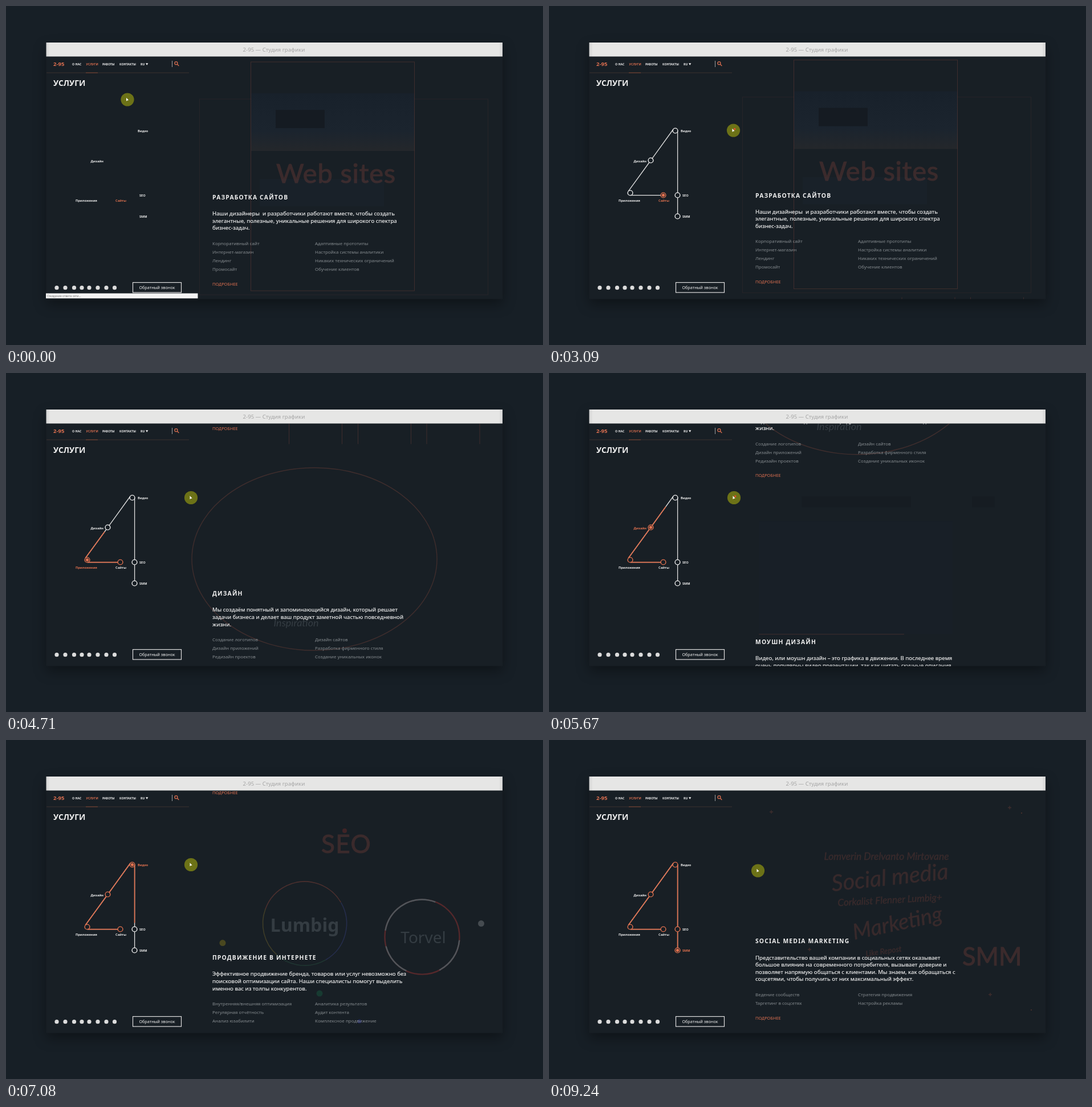
Animation of 942 by 594 pixels, one loop 9.36 s. Source, as an HTML page:

```html
<!DOCTYPE html>
<html lang="ru">
<head>
<meta charset="utf-8">
<title>Студия графики</title>
<style>
  html, body { margin: 0; width: 100%; height: 100%; overflow: hidden; background: #171f26; }
  svg { display: block; width: 942px; height: 594px; }
  text { font-family: "Noto Sans", "Open Sans", sans-serif; fill: #f1f1f1; }
  .title { font-weight: 700; letter-spacing: 1.2px; }
  .lead { font-weight: 500; stroke: #f1f1f1; stroke-width: .15px; }
  .item { fill: #858b8f; }
  .accent { fill: #dc6f50; }
  .nav, .label { font-weight: 600; }
  .big { font-family: Lato, sans-serif; fill: #c85a48; stroke: #c85a48; opacity: .2; }
  .script { font-family: Lato, sans-serif; font-style: italic; fill: #c85a48; stroke: #c85a48; stroke-width: .4px; opacity: .18; text-anchor: middle; }
  .pale { fill: #8d98a0; stroke: none; opacity: .24; }
  .outline { fill: none; stroke: #c8604a; stroke-opacity: .22; }
  .mid { text-anchor: middle; }
</style>
</head>
<body>
<svg viewBox="0 0 942 594">
  <defs>
    <filter id="shadow" x="-10%" y="-15%" width="120%" height="135%" color-interpolation-filters="sRGB">
      <feDropShadow dx="0" dy="9" stdDeviation="11" flood-color="#000" flood-opacity=".36"/>
    </filter>
    <linearGradient id="bar">
      <stop offset="0" stop-color="#d2d2d2"/><stop offset=".008" stop-color="#e6e6e5"/>
      <stop offset=".992" stop-color="#e6e6e5"/><stop offset="1" stop-color="#d2d2d2"/>
    </linearGradient>
    <linearGradient id="photo" x2="0" y2="1">
      <stop offset="0" stop-color="#18212b"/><stop offset=".65" stop-color="#1b242e"/>
      <stop offset="1" stop-color="#24272b"/>
    </linearGradient>
    <clipPath id="view"><rect x="322" y="88.5" width="549" height="425"/></clipPath>
    <clipPath id="page"><rect x="322" y="88.5" width="549" height="425.5"/></clipPath>
  </defs>
  <rect width="942" height="594" fill="#171f26"/>
  <rect x="70.5" y="64" width="800.5" height="449.5" fill="#181f25" filter="url(#shadow)"/>
  <g clip-path="url(#view)"><g id="scroller"></g></g>
  <rect x="70.5" y="64" width="800.5" height="24.5" fill="url(#bar)"/>
  <g id="sidebar"></g>
  <g id="graph"></g>
  <g id="status"></g>
  <g id="cursor">
    <circle r="11.6" fill="#6c7217"/>
    <path d="M-2-3.2v6l1.7-1.4 2.4-.3z" fill="#fff"/>
    <circle id="wheel" cx="2.2" cy="-2.4" r="1.8" fill="#e0502e"/>
  </g>
</svg>
<script>
const LOOP = 9360, PAGE = 425.5, SCROLL_TIME = 900;
const SCROLL_STARTS = [2977, 4060, 5141, 6418, 7542];
const ORANGE = [224, 113, 79], WHITE = [236, 236, 236];
const $ = id => document.getElementById(id);

// y is the vertical middle of the capitals
const text = (x, y, size, cls, str, extra = '') =>
  `<text x="${x}" y="${y + size * .36}" font-size="${size}" class="${cls}" ${extra}>${str}</text>`;
const script = (x, y, size, str, angle = 0, cls = '') =>
  text(x, y, size, 'script ' + cls, str, `transform="rotate(${angle} ${x} ${y})"`);
const box = (x, y, w, h, r = 0, extra = '') =>
  `<rect class="outline" x="${x}" y="${y}" width="${w}" height="${h}" rx="${r}" ${extra}/>`;
const disc = (x, y, r, fill, opacity = 1) =>
  `<circle cx="${x}" cy="${y}" r="${r}" fill="${fill}" opacity="${opacity}"/>`;
const plus = (x, y) => `<path class="outline" stroke-width="1.4" d="M${x - 3} ${y}h6m-3-3v6"/>`;
// part is a percentage of the full turn, color any CSS colour
const arc = (x, y, r, from, part, color, width = 1.6) =>
  `<circle cx="${x}" cy="${y}" r="${r}" fill="none" stroke="${color}" stroke-width="${width}"
    pathLength="100" stroke-dasharray="${part} 100" transform="rotate(${from} ${x} ${y})"/>`;

const sections = [
  {
    title: 'РАЗРАБОТКА САЙТОВ',
    lead: ['Наши дизайнеры\u00a0 и разработчики работают вместе, чтобы создать',
      'элегантные, полезные, уникальные решения для широкого спектра', 'бизнес-задач.'],
    left: ['Корпоративный сайт', 'Интернет-магазин', 'Лендинг', 'Промосайт'],
    right: ['Адаптивные прототипы', 'Настройка системы аналитики', 'Никаких технических ограничений', 'Обучение клиентов'],
    art: box(339.5, 163, 506, 343, 0, 'opacity=".35"') +
      '<rect x="430" y="153" width="286.5" height="101" fill="url(#photo)"/>' +
      '<rect x="473" y="182" width="86" height="32" fill="#151b22"/>' +
      '<rect x="445" y="303" width="218" height="48" fill="#192129"/>' +
      box(429.5, 98, 287, 401) + text(474, 293, 47, 'big', 'Web sites', 'letter-spacing=".8"')
  }, {
    title: 'ПРИЛОЖЕНИЯ',
    lead: ['Опыт создания двух собственных сервисов позволяет нам с уверенностью',
      'браться за приложения любой сложности. Мы думающая команда и знаем,',
      'что польза и удобство — это ключевые составляющие проекта.'],
    left: ['vOR приложения', 'Тестирование работоспособности', 'Работа с Ore Vault и Lumtra Park', 'Стратегия монетизации'],
    right: ['Corvand приложения', 'Создание прототипов', 'Подключение аналитики'],
    art: box(377.5, 143.5, 92.5, 182.5, 12) + box(496.5, 143.5, 92.5, 182.5, 12) +
      [619, 739.5].map(x => box(x, 60, 93, 63) + disc(x + 46.5, 123, 1.6, '#4a302c')).join('') +
      [496.5, 617.5, 738].map(x => box(x, 350.5, 93, 200)).join('') +
      [[543, 350.5], [710.5, 428], [738, 428]].map(p => disc(...p, 1.6, '#4a302c')).join('') +
      script(665, 145, 15.5, 'analyze', 0, 'pale') + script(785, 145, 15, 'prototype', 0, 'pale') +
      script(661, 327, 15, 'interact', 0, 'pale') + script(785, 327, 15, 'reward', 0, 'pale') +
      text(682, 231, 47, 'big', 'App\'s')
  }, {
    title: 'ДИЗАЙН',
    lead: ['Мы создаём понятный и запоминающийся дизайн, который решает',
      'задачи бизнеса и делает ваш продукт заметной частью повседневной', 'жизни.'],
    left: ['Создание логотипов', 'Дизайн приложений', 'Редизайн проектов'],
    right: ['Дизайн сайтов', 'Разработка фирменного стиля', 'Создание уникальных иконок'],
    art: '<ellipse class="outline" cx="541" cy="290" rx="215" ry="160" stroke-width="1.4"/>' +
      script(509, 401, 18, 'Inspiration', 0, 'pale')
  }, {
    title: 'МОУШН ДИЗАЙН',
    lead: ['Видео, или моушн дизайн – это графика в движении. В последнее время',
      'очень популярны видео презентации, так как читать скучные описания',
      'никому не интересно. Мы расскажем о вашем продукте ярко, просто', 'и понятно для каждого клиента.'],
    left: ['Видео презентации', 'Анимация логотипов'],
    right: ['Рекламные ролики', 'Анимация интерфейсов'],
    art: '<rect x="443" y="98" width="192" height="19" fill="#161c22"/>' +
      '<rect x="742" y="98" width="40" height="19" fill="#161c22"/>' +
      '<rect x="368" y="142" width="340" height="197" fill="#18202a" opacity=".5"/>' +
      '<path class="outline" d="M368 339.5h255"/>'
  }, {
    title: 'ПРОДВИЖЕНИЕ В ИНТЕРНЕТЕ',
    lead: ['Эффективное продвижение бренда, товаров или услуг невозможно без',
      'поисковой оптимизации сайта. Наши специалисты помогут выделить', 'именно вас из толпы конкурентов.'],
    left: ['Внутренняя/внешняя оптимизация', 'Регулярная отчётность', 'Анализ юзабилити'],
    right: ['Аналитика результатов', 'Аудит контента', 'Комплексное продвижение'],
    art: text(553, 151.5, 44, 'big', 'SEO', 'letter-spacing="1.5"') + disc(594, 128, 4, '#402426') +
      arc(524, 290.5, 73.5, 200, 36, '#4b2f2e') + arc(524, 290.5, 73.5, -30, 25, '#252d4c') +
      arc(524, 290.5, 73.5, 60, 20, '#1f3531') + arc(524, 290.5, 73.5, 132, 19, '#3f3d28') +
      arc(730, 314, 65.5, 0, 100, '#55282b', 2.4) + arc(730, 314, 65.5, 190, 28, '#50565b', 2.4) +
      arc(730, 314, 65.5, 5, 16, '#50565b', 2.4) + arc(730, 314, 65.5, 115, 14, '#50565b', 2.4) +
      text(524, 293, 32, 'mid pale', 'Lumbig', 'font-weight="600"') +
      text(732, 315, 28, 'mid pale', 'Torvel') +
      disc(380, 324.5, 5.5, '#4a4820') + disc(833.5, 290.5, 5.5, '#454b50') +
      disc(550, 413, 5.5, '#173a31') + disc(620, 462, 3.5, '#20285a')
  }, {
    title: 'SOCIAL MEDIA MARKETING',
    lead: ['Представительство вашей компании в социальных сетях оказывает',
      'большое влияние на современного потребителя, вызывает доверие и',
      'позволяет напрямую общаться с клиентами. Мы знаем, как обращаться с',
      'соцсетями, чтобы получить от них максимальный эффект.'],
    left: ['Ведение сообществ', 'Таргетинг в соцсетях'],
    right: ['Стратегия продвижения', 'Настройка рекламы'],
    art: script(592, 204, 17.4, 'Lomverin Drelvanto Mirtovane') + script(598, 240, 39.5, 'Social media', -6) +
      script(598, 280, 17, 'Corkalist Flenner Lumbig+', -3) + script(611, 320, 38, 'Marketing', -12) +
      script(587, 370, 13.5, 'Like Repost', -8) + text(725, 379, 43.5, 'big', 'SMM') +
      [[390, 126], [808, 118.5], [457, 367], [774, 446]].map(p => plus(...p)).join('') +
      disc(829, 128, 1, '#55332d') + disc(846, 473, 1, '#55332d')
  }
];

// Copy is stacked upwards from the "more" link at the bottom of each page
function sectionMarkup({ title, lead, left, right, art }, index) {
  const listTop = 487 - 26 - (left.length - 1) * 15;
  const leadTop = listTop - 27 - (lead.length - 1) * 12.6;
  const column = (x, items) => items.map((s, i) => text(x, listTop + i * 15, 7.95, 'item', s)).join('');
  return `<g transform="translate(0 ${index * PAGE})" clip-path="url(#page)">${art}` +
    text(362, leadTop - 28.5, 10.3, 'title', title) +
    lead.map((s, i) => text(362, leadTop + i * 12.6, 9.65, 'lead', s)).join('') +
    column(362, left) + column(542, right) + text(362, 487, 7.4, 'accent', 'ПОДРОБНЕЕ') + '</g>';
}
$('scroller').innerHTML = sections.map(sectionMarkup).join('');

$('sidebar').innerHTML =
  text(470, 77, 9.6, 'mid', '2-95 — Студия графики', 'style="fill:#a5a5a5"') +
  text(83, 102, 9.6, 'title accent', '2-95', 'style="letter-spacing:0"') +
  [[116, 'О НАС'], [140.5, 'УСЛУГИ', 'accent'], [169, 'РАБОТЫ'], [199, 'КОНТАКТЫ'], [236, 'RU']]
    .map(([x, s, cls = '']) => text(x, 102, 5.2, 'nav ' + cls, s)).join('') +
  `<path d="M245 100.3h4.4l-2.2 3.4z" fill="#eee"/>
   <path d="M291.5 96v11" stroke="#9a9da0"/>
   <g fill="none" stroke="#d66c4e" stroke-width="1.3"><circle cx="298.4" cy="100.2" r="2.5"/><path d="M300.3 102l3 3"/></g>
   <path d="M71 117h250" stroke="#3a302f"/><path d="M140 117h21" stroke="#7d4535"/>` +
  text(83, 135.5, 13.8, 'nav', 'УСЛУГИ') +
  [89, 104, 119.5, 133, 146, 161, 176, 190.5].map(x => disc(x, 493.7, 3.6, '#dcdcdc')).join('') +
  '<rect x="222.5" y="484.5" width="85" height="17.5" fill="none" stroke="#dedede" stroke-width="1.2"/>' +
  text(265, 493, 7.2, 'mid', 'Обратный звонок');

$('status').innerHTML = '<rect x="70" y="503.5" width="266.5" height="8.8" fill="#f3f3f3"/>' +
  text(72, 508, 5, '', 'Ожидание ответа сети...', 'style="fill:#777"');

const nodes = [
  [200.5, 331.5, 'Сайты', 201.5, 341, 'middle'], [142.5, 327.5, 'Приложения', 141, 341, 'middle'],
  [178.5, 270.5, 'Дизайн', 171, 271.5, 'end'], [221.5, 218.5, 'Видео', 231, 219, 'start'],
  [225.5, 331.5, 'SEO', 234, 332, 'start'], [225.5, 368.5, 'SMM', 234, 369, 'start']
];
const links = ['M196 331.7H143', 'M139.3 324.3L176 274', 'M181 267.2L218 216', 'M225.6 218.5V327', 'M225.6 336V364'];
const stroke = (color, width) => `fill="none" stroke="${color}" stroke-width="${width}" pathLength="1"`;
$('graph').innerHTML =
  links.map(d => `<path class="base" d="${d}" ${stroke('#e2e2e2', 1.3)}/>
    <path class="trail" d="${d}" ${stroke('#e0714f', 1.7)}/>`).join('') +
  nodes.map(([x, y, name, labelX, labelY, anchor]) =>
    `<circle class="ring" cx="${x}" cy="${y}" r="4.4" ${stroke('#e2e2e2', 1.4)}/>
     <circle class="dot" cx="${x}" cy="${y}" r="2.7" fill="#e0714f"/>` +
    text(labelX, labelY, 5.6, 'label', name, `text-anchor="${anchor}"`)).join('');
const all = cls => [...document.querySelectorAll('#graph .' + cls)];
const [bases, trails, rings, dots, labels] = ['base', 'trail', 'ring', 'dot', 'label'].map(all);

const ramp = (t, from, to) => Math.min(1, Math.max(0, (t - from) / (to - from)));
const ease = u => u < .5 ? 4 * u ** 3 : 1 - 4 * (1 - u) ** 3;
const lerp = (a, b, u) => a + (b - a) * u;
const tint = u => `rgb(${WHITE.map((c, i) => Math.round(lerp(c, ORANGE[i], u)))})`;
const reveal = (el, part) => el.setAttribute('stroke-dasharray', `${part} 2`);

function draw(t) {
  const progress = SCROLL_STARTS.map(s => ease(ramp(t, s, s + SCROLL_TIME)));
  const offset = progress.reduce((sum, p) => sum + p, 0) * PAGE;
  $('scroller').setAttribute('transform', `translate(0 ${-offset})`);
  $('status').style.display = t < 400 ? '' : 'none';

  const intro = ease(ramp(t, 30, 960));
  bases.forEach(el => reveal(el, intro));
  trails.forEach((el, i) => reveal(el, Math.min(1, progress[i] ** 1.5 / .95)));

  const arrival = i => SCROLL_STARTS[i - 1] + SCROLL_TIME;
  nodes.forEach((_, i) => {
    const entered = i ? ramp(t, arrival(i), arrival(i) + 200) : ramp(t, 1020, 1500);
    const left = i < 5 ? ramp(t, arrival(i + 1), arrival(i + 1) + 200) : 0;
    reveal(rings[i], intro);
    rings[i].setAttribute('stroke', tint(i ? ramp(progress[i - 1], .96, 1) : entered));
    dots[i].setAttribute('opacity', entered - left);
    labels[i].style.fill = tint((i ? entered : 1) - left);
  });

  const first = ease(ramp(t, 2130, 2900)), settle = ramp(t, 4000, 4100), last = ease(ramp(t, 7320, 7540));
  const x = 213 + 110.5 * first + settle + 42 * last;
  const y = 164 + 54 * first + .5 * settle + 10.5 * last;
  $('cursor').setAttribute('transform', `translate(${x} ${y})`);
  const wheeling = SCROLL_STARTS.some(s => t >= s && t < s + SCROLL_TIME * .68);
  $('wheel').style.display = wheeling ? '' : 'none';
}

function tick() {
  draw(performance.now() % LOOP);
  requestAnimationFrame(tick);
}
tick();
</script>
</body>
</html>
```
